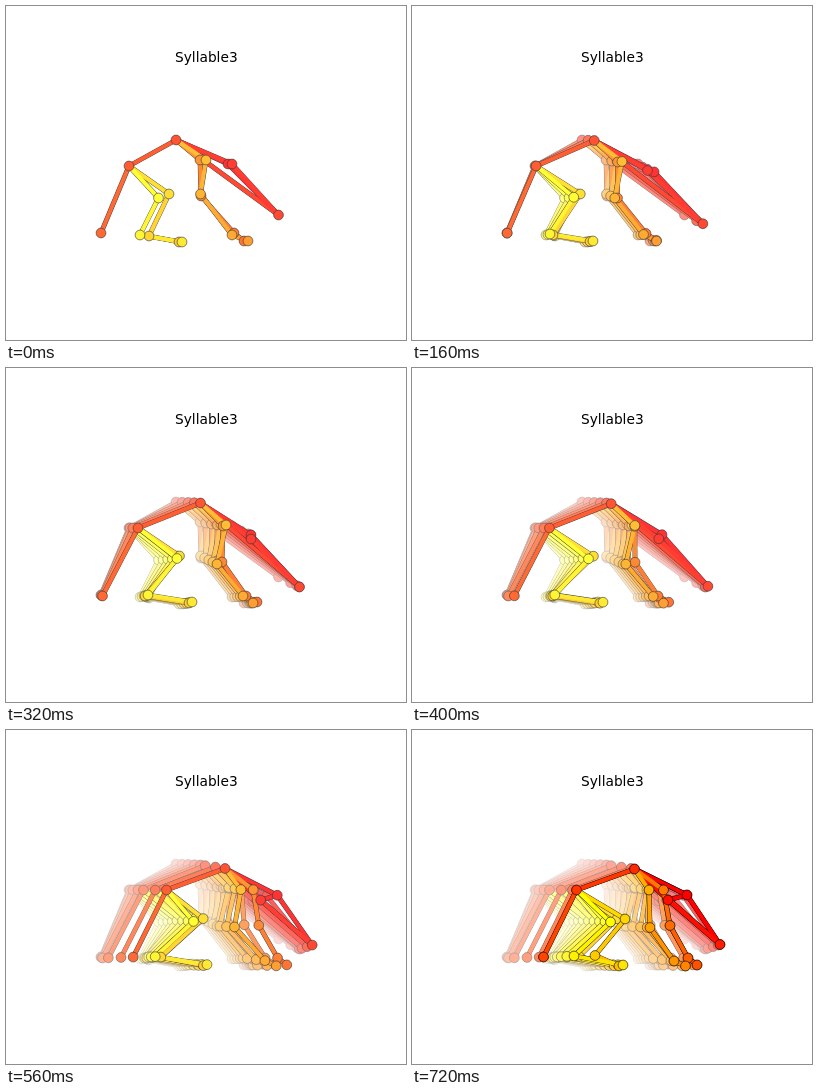
An HTML page with a canvas that plays this animation: 400x334 px, repeating every 0.8 s.

```html
<!DOCTYPE html>
<html lang="en">
<head>
<meta charset="utf-8">
<title>Syllable3</title>
<style>
  html, body { margin: 0; width: 100%; height: 100%; overflow: hidden; background: #fff; }
  canvas { display: block; width: 400px; height: 334px; }
</style>
</head>
<body>
<canvas id="stage" width="400" height="334"></canvas>
<script>
const ctx = document.getElementById('stage').getContext('2d');
const STEP_MS = 80, POSES = 10, MID_STEP = 4;

const linear = v => v;
const square = v => v * v;
const cubic = v => v ** 3;
const outCubic = v => 1 - (1 - v) ** 3;
const smooth = v => v * v * (3 - 2 * v);
const surge = v => smooth(Math.min(1, v * 1.3));

// A joint travels start -> middle -> end, with one easing for each half.
const mover = (first, second) => (start, mid, end) => step => {
  const early = step < MID_STEP;
  const [from, to] = early ? [start, mid] : [mid, end];
  const u = early
    ? first(step / MID_STEP)
    : second((step - MID_STEP) / (POSES - 1 - MID_STEP));
  return from.map((c, i) => c + (to[i] - c) * u);
};
const lunge = mover(outCubic, surge);
const reach = mover(linear, surge);
const follow = mover(cubic, surge);
const trail = mover(linear, smooth);
const glide = mover(linear, linear);
const lag = mover(linear, square);

const skeleton = {
  earA: lunge([222, 158], [245, 167], [275, 165]),
  earB: reach([226, 158], [245, 171], [256, 170]),
  nose: lunge([272.5, 209], [293.5, 219], [308, 214.5]),
  neck: reach([170, 134], [194.5, 135], [222.5, 139]),
  rump: follow([123, 160], [132, 160], [164.5, 160]),
  tail: follow([95, 227], [96.5, 228], [131.5, 227]),

  forePawA: reach([238, 235], [251, 234], [285, 235]),
  wristA: reach([228, 227], [240, 228], [276, 228]),
  elbowA: reach([195, 190], [216, 194], [258, 195.5]),
  shoulderA: reach([194, 154], [217, 158], [251.5, 160]),

  forePawB: reach([242, 235], [247, 235], [273.5, 236]),
  wristB: reach([226, 229], [237, 228], [262, 231]),
  elbowB: trail([194.5, 188], [211, 196], [238, 197.5]),
  shoulderB: reach([200, 154], [220, 157], [237, 160]),

  hindPawA: glide([173, 236], [183, 235], [207, 236]),
  hockA: lag([143, 230], [139, 228], [183, 225.5]),
  kneeA: glide([163, 188], [173.5, 188], [213, 189]),

  hindPawB: glide([176, 236], [186, 234], [211, 235]),
  hockB: lag([134, 229], [142, 227], [162, 226]),
  kneeB: glide([152.5, 192], [171, 190.5], [198.5, 192])
};
const names = Object.keys(skeleton);

// The first joint of each bone gives its colour.
const chains = [
  'nose neck', 'earA earB', 'earA nose', 'earB nose', 'earA neck', 'earB neck',
  'tail rump neck',
  'forePawA wristA elbowA shoulderA neck',
  'forePawB wristB elbowB shoulderB neck',
  'hindPawA hockA kneeA rump',
  'hindPawB hockB kneeB rump'
];
const bones = chains.flatMap(chain => {
  const ids = chain.split(' ');
  return ids.slice(1).map((id, i) => [ids[i], id]);
});

const colorOf = name =>
  `rgb(255, ${Math.round(255 * names.indexOf(name) / (names.length - 1))}, 0)`;

function strokeBone(a, b, width, color) {
  ctx.lineWidth = width;
  ctx.strokeStyle = color;
  ctx.beginPath();
  ctx.moveTo(...a);
  ctx.lineTo(...b);
  ctx.stroke();
}

function drawPose(step) {
  const at = {};
  for (const name of names) at[name] = skeleton[name](step);
  for (const [a, b] of bones) strokeBone(at[a], at[b], 4.8, '#000');
  for (const [a, b] of bones) strokeBone(at[a], at[b], 4.1, colorOf(a));
  ctx.lineWidth = 0.6;
  ctx.strokeStyle = '#000';
  for (const name of names) {
    ctx.beginPath();
    ctx.arc(...at[name], 4.9, 0, Math.PI * 2);
    ctx.fillStyle = colorOf(name);
    ctx.fill();
    ctx.stroke();
  }
}

function veil(alpha) {
  ctx.fillStyle = `rgba(255, 255, 255, ${alpha})`;
  ctx.fillRect(0, 0, 400, 334);
}

// Older poses fade under one more white veil per step.
function drawScene(last) {
  veil(1);
  for (let step = 0; step <= last; step++) {
    drawPose(step);
    if (step < POSES - 1) veil(0.2);
  }
  ctx.fillStyle = '#000';
  ctx.font = '13.75px "DejaVu Sans", sans-serif';
  ctx.textAlign = 'center';
  ctx.fillText('Syllable3', 200.3, 56);
}

let shown = -1;
function tick() {
  const step = Math.floor(performance.now() / STEP_MS) % POSES;
  if (step !== shown) drawScene(shown = step);
  requestAnimationFrame(tick);
}
tick();
</script>
</body>
</html>
```
